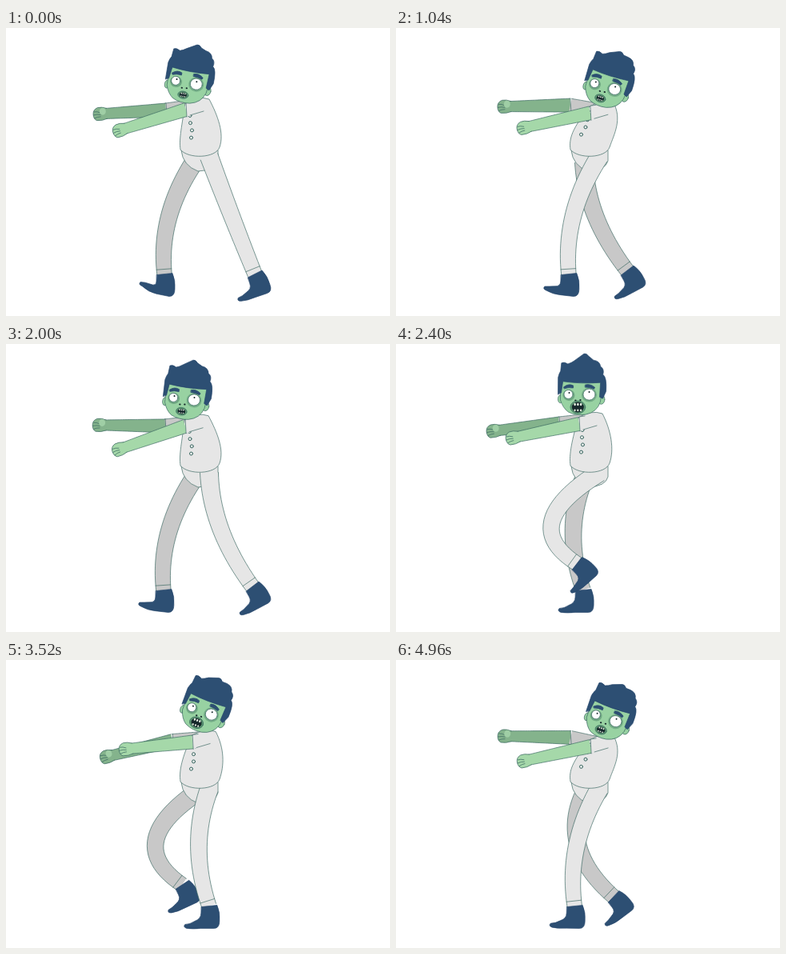
Write an HTML page with a canvas that moves like this. It is 480 px wide and 360 px high and loops after 5 s.

```html
<!DOCTYPE html>
<html lang="en">
<head>
<meta charset="utf-8">
<title>Zombie walk</title>
<style>
html, body { margin: 0; width: 100%; height: 100%; overflow: hidden; background: #fff; }
canvas { display: block; width: 100vw; height: 100vh; }
</style>
</head>
<body>
<canvas id="stage"></canvas>
<script>
const W = 480, H = 360, LOOP = 5000, CYCLE = 1920, STEP = 40;
const { cos, sin, max, PI } = Math;
const canvas = document.getElementById('stage');
const ctx = canvas.getContext('2d');
const LINE = '#35635d', NAVY = '#2d4f73', NAVY_LINE = '#24456a', CLOTH = '#e6e6e6', SHADE = '#c8c8c8';
const SKIN = '#98d2a2', ARM = '#a5d8a9', FAR_ARM = '#84b38c', DARK = '#17282c';

// Periodic swing: a mean plus [cosine, sine] weights of each harmonic.
const wave = (angle, mean, ...harmonics) => harmonics.reduce(
  (sum, [c, s], i) => sum + c * cos((i + 1) * angle) + s * sin((i + 1) * angle), mean);
const rad = degrees => degrees * PI / 180;
const middle = (a, b) => [(a[0] + b[0]) / 2, (a[1] + b[1]) / 2];

function paint(path, fill, stroke = LINE, width = 0.65) {
  if (fill) { ctx.fillStyle = fill; ctx.fill(path); }
  if (stroke) { ctx.strokeStyle = stroke; ctx.lineWidth = width; ctx.stroke(path); }
}
const shape = (d, fill, stroke, width) => paint(new Path2D(d), fill, stroke, width);
function oval(x, y, rx, ry, fill, stroke = LINE, width) {
  const path = new Path2D();
  path.ellipse(x, y, rx, ry, 0, 0, 7);
  paint(path, fill, stroke, width);
}
function at(x, y, angle, draw) {
  ctx.save();
  ctx.translate(x, y);
  ctx.rotate(angle);
  draw();
  ctx.restore();
}

// Tapered limb bending through its middle point.
function tube(a, mid, b, w0, w1, fill, cuff) {
  const c = [0, 1].map(k => 2 * mid[k] - (a[k] + b[k]) / 2);
  const left = [], right = [];
  for (let i = 0; i <= 24; i++) {
    const t = i / 24, s = 1 - t;
    const [x, y] = [0, 1].map(k => s * s * a[k] + 2 * s * t * c[k] + t * t * b[k]);
    const [dx, dy] = [0, 1].map(k => s * (c[k] - a[k]) + t * (b[k] - c[k]));
    const r = (w0 + (w1 - w0) * t) / 2 / Math.hypot(dx, dy);
    left.push([x - dy * r, y + dx * r]);
    right.push([x + dy * r, y - dx * r]);
  }
  const line = pts => 'M' + pts.join('L');
  shape(line(left.concat([...right].reverse())) + 'Z', fill, null);
  shape(line(left) + line(right), null);
  if (cuff) shape(line([left[23], right[23]]), null);
}

function boot(x, y, angle, toe) {
  at(x, y, angle, () => shape(
    `M-9.5 1L10 -1Q14 8 13 19Q13 28 6 28L-10 ${28 - toe / 4}Q-20 ${29 - toe / 2} -28 ${28 - toe}
     Q-33 ${26 - toe} -30 ${23 - toe}Q-24 ${23 - toe} -18 ${19 - toe / 2}Q-10 16 -10 9Z`, NAVY, NAVY_LINE));
}

// Gait: heel contact at angle 0, push-off at PI, then the swing forward.
function leg(hip, gait, fill) {
  const turn = (gait + 2 * PI) % (2 * PI);
  const swing = max(0, -sin(turn)), push = max(0, -cos(turn)) ** 8;
  const heelUp = sin(PI * max(0, (turn - rad(130)) / rad(230))) ** 2;
  const toe = 13 * max(0, cos(turn)) ** 16 + 6 * heelUp;
  const ankle = [
    hip[0] + wave(turn, -2.2, [-33, 5.5], [12.2, -1], [-14, -8]),
    307.5 - 33 * swing ** 1.5
  ];
  const [mx, my] = middle(hip, ankle);
  tube(hip, [mx - 13 - 32 * swing + 12 * push, my + 5 * swing - 1], ankle, 23, 18.5, fill, true);
  boot(...ankle, rad(-52 * heelUp), toe);
}

function hand(x, y, angle, fill, thumb) {
  at(x, y, angle, () => {
    shape('M2 -6.5Q-4 -9 -9 -8Q-15 -6 -15 0Q-15 6 -11 8Q-4 9 2 6.5', fill);
    for (const k of [-1, 0, 1]) {
      shape(`M${Math.abs(k) - 14.5} ${k * 4 + 1}Q-10 ${k * 3.5} -6 ${k * 2.5 + 1}`, null);
    }
    if (thumb) oval(-3, -3, 4, 4.5, thumb, null);
  });
}
function arm(shoulder, wrist, fill, thumb) {
  tube(shoulder, middle(shoulder, wrist), wrist, 17, 13, fill);
  hand(...wrist, Math.atan2(shoulder[1] - wrist[1], shoulder[0] - wrist[0]), fill, thumb);
}

function torso(nx, ny, angle) {
  shape(`M${nx - 16} ${ny + 4}Q${nx} ${ny - 6} ${nx + 14} ${ny - 1}
    C${nx + 25} ${ny + 20} 273 132 267 149C262 163 228 164 218 152
    C216 138 220 ${ny + 32} ${nx - 16} ${ny + 4}Z`, CLOTH);
  for (let i = 0; i < 4; i++) {
    const x = 231.5 + (nx - 242) * (3 - i) * 0.25 + (i === 2 ? 1.5 : 0);
    oval(x, 107.5 + 9.2 * i + 2 * cos(angle), 2, 2, '#eef0ef', LINE, 1);
  }
}

function nearSleeve([sx, sy], nx, ny) {
  shape(`M${sx} ${sy - 9}L${nx - 4} ${ny + 1}L${nx + 6} ${ny + 14}L${sx + 1} ${sy + 9}Z`, CLOTH, null);
  shape(`M${nx - 8} ${ny + 2}L${sx} ${sy - 9}L${sx + 1} ${sy + 9}M${sx + 5} ${sy + 7}L${nx + 7} ${ny + 14}`, null);
}

function mouth(w, h) {
  oval(-1, 16, w, h, '#5d9872');
  w -= 2;
  h -= 1.6;
  oval(-1, 16, w, h, DARK, null);
  for (const k of [-0.5, 0, 0.5]) {
    oval(k * w - 1, 16 - h * 0.55, w * 0.17, h * 0.28, '#e9f2e4', null);
    oval(k * w - 1, 16 + h * 0.6, w * 0.15, h * 0.22, '#e9f2e4', null);
  }
}

function head(x, y, tilt, open) {
  const peak = -51 + tilt / 4;
  at(x, y, rad(tilt), () => {
    oval(28, 6, 4.5, 6, SKIN);
    oval(-23, 6, 3, 5, SKIN);
    shape('M-23 -18L-23 7Q-20 17 -13 22Q-3 27 9 25Q23 22 27 9L31 -18Z', SKIN);
    shape(`M-26 0L-26 -21Q-25 -26 -23 -29L-22 -39Q-19 -41 -14 -38Q-10 -39 -6 -42L6 ${peak}
      Q9 ${peak - 1} 12 ${peak + 3}L18 -43Q26 -42 27 -35Q32 -32 30 -25Q35 -22 34 -4L30 5L26 3L27 -15
      Q2 -13 -20 -16L-22 -2Z`, NAVY, NAVY_LINE);
    oval(-12.5, 1, 7.5, 7, '#6fa782', null);
    oval(13, 0.5, 9.5, 9, '#74ad87', null);
    oval(-13, 0, 5.5, 5.5, '#fff');
    oval(13, 0, 7.5, 7, '#fff');
    oval(-12, -2, 1, 1, DARK, null);
    oval(13, -3, 1, 1, DARK, null);
    shape('M-19 -9Q-13 -14 -7 -11L-7 -8Q-13 -9 -18 -7Z', NAVY, NAVY_LINE);
    shape('M8 -12Q14 -14 20 -9L19 -7Q14 -9 8 -9Z', NAVY, NAVY_LINE);
    oval(-4, 7.5, 1.2, 1, DARK, null);
    oval(2, 7, 1.2, 1, DARK, null);
    mouth(open * 0.85 + 2.7, open);
  });
}

function draw(time) {
  const scale = window.devicePixelRatio || 1;
  if (canvas.width !== Math.round(W * scale)) {
    canvas.width = Math.round(W * scale);
    canvas.height = Math.round(H * scale);
  }
  ctx.setTransform(canvas.width / W, 0, 0, canvas.height / H, 0, 0);
  ctx.fillStyle = '#fff';
  ctx.fillRect(0, 0, W, H);
  ctx.lineJoin = ctx.lineCap = 'round';

  const phase = Math.floor(time % LOOP / STEP) * STEP % CYCLE;
  const angle = phase / CYCLE * 2 * PI;
  const nx = wave(angle, 248.5, [-8.5, -4.5]);
  const ny = wave(angle, 91, [-1, -3], [0, 3]);
  const near = [nx - 15, ny + 12];
  const far = [nx - 40, wave(angle, 99.5, [3, 0])];
  const nearWrist = [near[0] - 77, near[1] + wave(angle, 16, [4, 4], [4, 5])];
  const farWrist = [far[0] - 76, wave(angle, 107, [2, -1], [-2, -11])];

  arm(far, farWrist, FAR_ARM, '#9fcea5');
  const inner = [nx - 8, ny + 9];
  tube(inner, middle(inner, far), far, 19, 17, SHADE);
  shape(`M${far[0]} ${far[1] - 8.5}L${far[0] + 1} ${far[1] + 8.5}`, null);

  leg([235, 168], angle, SHADE);
  shape('M219 153Q221 172 240 179Q262 178 265 166L265 153Z', CLOTH);
  leg([254, 161], angle + PI, CLOTH);
  torso(nx, ny, angle);
  arm(near, nearWrist, ARM);
  nearSleeve(near, nx, ny);
  head(
    wave(angle, 241.5, [-16.5, -13]),
    wave(angle, 67, [-2, -1], [3, 2]),
    wave(angle, 11.5, [-2, -11]),
    wave(angle, 6.3, [0, 0], [-1.7, 0])
  );
}

const start = performance.now();
function tick() {
  draw(performance.now() - start);
  requestAnimationFrame(tick);
}
tick();
</script>
</body>
</html>
```
